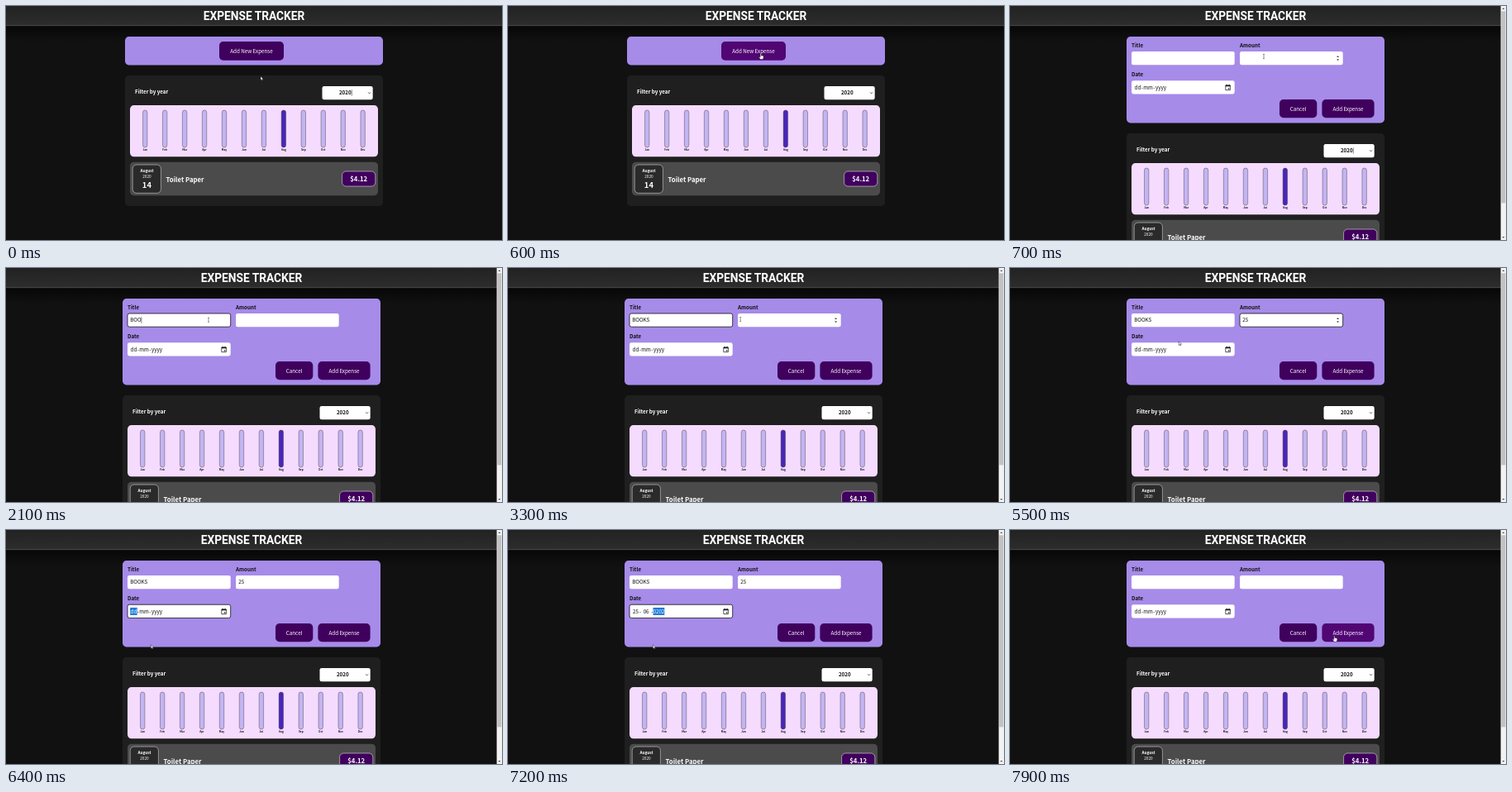
These frames come from a looping animation (600x283 px, 8000 ms). An HTML page:

```html
<!DOCTYPE html>
<html lang="en">
<head>
<meta charset="utf-8">
<title>Expense Tracker</title>
<style>
html, body { margin: 0; height: 100%; overflow: hidden; background: #111; }
svg { display: block; width: 100vw; height: 100vh; }
text { font: 6.25px "Noto Sans CJK JP", "Noto Sans CJK", "Noto Sans", sans-serif; fill: #fff; white-space: pre; }
.b { font-weight: 700; }
.m { text-anchor: middle; }
.k { fill: #111; }
.btn { fill: #40005d; }
.btn.hover { fill: #510674; }
.input { fill: #fff; stroke-width: .8; }
.input.focus { stroke: #111; }
.caret { stroke: #111; stroke-width: .5; }
</style>
</head>
<body>
<svg viewBox="0 0 600 283" preserveAspectRatio="none">
  <defs>
    <linearGradient id="bar" x2="0" y2="1"><stop stop-color="#222"/><stop offset="1" stop-color="#2d2d2d"/></linearGradient>
    <linearGradient id="shade" x2="0" y2="1"><stop stop-opacity=".6"/><stop offset="1" stop-opacity="0"/></linearGradient>
  </defs>
  <rect width="600" height="283" fill="#111"/>
  <rect y="24" width="600" height="20" fill="url(#shade)"/>
  <rect width="600" height="23.5" fill="url(#bar)"/>
  <path d="M0 23.7H600" stroke="#6a6a6a" stroke-width=".6"/>

  <g id="page">
    <text class="m b" x="300" y="17" style="font-family:Roboto,sans-serif;font-size:13.75px">EXPENSE TRACKER</text>
    <rect id="panel" x="144" y="37" width="312" rx="4.7" fill="#a68be9"/>
    <g id="closed">
      <rect id="newBtn" class="btn" x="258" y="43" width="78" height="22.7" rx="4.7"/>
      <text class="m" x="297" y="56.7" font-weight="500">Add New Expense</text>
    </g>
    <g id="list">
      <rect x="144" y="84" width="312" height="158" rx="4.7" fill="#1f1f1f"/>
      <text class="b" x="156" y="105.9">Filter by year</text>
      <rect x="382.5" y="97" width="61.2" height="16.3" rx="2.3" fill="#fff"/>
      <text class="m b k" x="410.3" y="107.4">2020</text>
      <path id="yearCaret" class="caret" d="M418.3 101.3V108.7"/>
      <path d="M438.2 104.4L439.6 105.9 441 104.4" fill="none" stroke="#111" stroke-width=".7"/>
      <rect x="150" y="120" width="300" height="62.3" rx="4.7" fill="#f5dbfe"/>
      <g id="months"></g>
      <rect x="150" y="188.7" width="300" height="40.5" rx="4.7" fill="#4b4b4b"/>
      <rect x="153.2" y="192" width="34.2" height="34.3" rx="4.7" fill="#2a2a2a" stroke="#ececec" stroke-width=".5"/>
      <text class="m b" x="170.4" y="200.8" style="font-size:4.69px">August</text>
      <text class="m" x="170.4" y="207.6" style="font-size:4.69px">2020</text>
      <text class="m b" x="170.4" y="219.6" style="font-size:9.38px">14</text>
      <text class="b" x="193.6" y="212.5" style="font-size:7.81px">Toilet Paper</text>
      <rect x="406.6" y="200" width="40.2" height="18" rx="4.7" fill="#40005d" stroke="#fff" stroke-width=".5"/>
      <text class="m b" x="426.7" y="212.4" style="font-size:7.81px">$4.12</text>
    </g>
  </g>

  <g id="form">
    <text class="b k" x="147" y="49.8">Title</text>
    <text class="b k" x="278" y="49.8">Amount</text>
    <text class="b k" x="147" y="84.8">Date</text>
    <rect id="title" class="input" x="147" y="55" width="124.7" height="16.2" rx="2.3"/>
    <rect id="amount" class="input" x="278" y="55" width="124.7" height="16.2" rx="2.3"/>
    <rect id="date" class="input" x="147" y="90.2" width="124.7" height="16.2" rx="2.3"/>
    <text id="titleText" class="k" x="150.2" y="65.4"></text>
    <text id="amountText" class="k" x="281.2" y="65.4"></text>
    <path id="caret" class="caret"/>
    <path id="spin" d="M395.2 61.9L396.6 60 398 61.9ZM395.2 64.3H398L396.6 66.2Z" fill="#444"/>
    <rect id="mark" y="93.9" height="9" fill="#1a78d6"/>
    <g id="parts"></g>
    <text class="m k" x="159.8" y="100.7">-</text>
    <text class="m k" x="174.4" y="100.7">-</text>
    <path d="M260.8 95.9H266.4V101.6H260.8ZM262.1 94.6V96M265.1 94.6V96" fill="none" stroke="#111" stroke-width=".7"/>
    <path d="M260.8 96.6H266.4M263.8 99.8H265.4" stroke="#111" stroke-width="1.3"/>
    <rect id="cancel" class="btn" x="326" y="113" width="45.3" height="22.2" rx="4.7"/>
    <rect id="addBtn" class="btn" x="377.4" y="113" width="63.2" height="22.2" rx="4.7"/>
    <text class="m" x="348.6" y="126.7" font-weight="500">Cancel</text>
    <text class="m" x="409" y="126.7" font-weight="500">Add Expense</text>
    <rect x="593.6" width="6.4" height="283" fill="#f1f1f1"/>
    <rect x="594.3" y="6.3" width="5" height="232" fill="#c1c1c1"/>
    <path d="M595.3 4L596.8 2.2 598.3 4ZM595.3 279H598.3L596.8 280.8Z" fill="#505050"/>
  </g>
  <path id="pointer" stroke-width=".45" stroke-linejoin="round"/>
</svg>
<script>
const $ = id => document.getElementById(id);
const LOOP = 8000, OPEN = 700, SUBMIT = 7700;

const cursors = {
  arrow: "M0 0V4.7L1.1 3.7 1.8 5.3 2.6 5 1.9 3.4H3.4Z",
  hand: "M-.9 5V.6Q-.9 0 -.4 0T.1 .6V2.7L2.5 3.2Q3.1 3.4 3.1 4V5.3L2.4 7.6H-.6L-2.5 4.9Q-2.2 4 -.9 5Z",
  text: "M-.9 -2.6H.9M0 -2.6V2.6M-.9 2.6H.9"
};
// time, x, y
const path = [
  [0, 308, 85], [150, 308, 82], [500, 306, 57], [600, 306, 57], [700, 307, 61], [850, 307, 61],
  [1200, 245, 62.7], [2900, 245, 62.7], [3400, 285.3, 62], [5100, 285.3, 62], [5700, 176, 98],
  [5950, 176, 98], [6300, 175.3, 138.8], [7200, 175.3, 138.8], [7600, 392.7, 127.6], [8000, 392.7, 127.6]
];
const focusTimes = [[1200, "title"], [3500, "amount"], [5800, "date"], [SUBMIT, ""]];
const titleKeys = [1500, 1700, 2000, 2300, 2500];
const amountKeys = [4400, 4700];
const fields = [
  { x: 150.6, w: 7.7, typed: [[0, "dd"], [6500, "02"], [6700, "25"]] },
  { x: 161.3, w: 11.6, typed: [[0, "mm"], [6800, "00"], [6900, "06"]] },
  { x: 175.9, w: 13, typed: [[0, "yyyy"], [7000, "0002"], [7100, "0020"], [7200, "0202"], [7300, "2021"]] }
];

$("months").innerHTML = "Jan Feb Mar Apr May Jun Jul Aug Sep Oct Nov Dec".split(" ").map((name, i) => {
  const x = 168.2 + i * 23.95;
  return `<rect x="${x - 2.7}" y="126" width="5.4" height="45" rx="2.7" stroke="#313131" stroke-width=".4"
    fill="${name == "Aug" ? "#4826b9" : "#c3b4f3"}"/>
    <text class="m b k" x="${x}" y="175.2" style="font-size:3.13px">${name}</text>`;
}).join("");
$("parts").innerHTML = fields.map(f => `<text class="m" x="${f.x + f.w / 2}" y="100.7"></text>`).join("");

const show = (id, on) => $(id).style.display = on ? "" : "none";
const latest = (steps, t) => steps.filter(s => s[0] <= t).pop();
const blink = age => age % 1000 < 500;

function position(t) {
  const i = path.findIndex(p => p[0] > t);
  const [t0, x0, y0] = path[i - 1], [t1, x1, y1] = path[i];
  const u = (t - t0) / (t1 - t0), e = u * u * (3 - 2 * u);
  return [x0 + (x1 - x0) * e, y0 + (y1 - y0) * e];
}

function over(id, [x, y]) {
  const [l, top, w, h] = ["x", "y", "width", "height"].map(a => +$(id).getAttribute(a));
  return x >= l && x <= l + w && y >= top && y <= top + h;
}

function drawForm(t, pos) {
  const focus = (latest(focusTimes, t) || [0, ""])[1];
  const done = t >= SUBMIT;
  for (const id of ["title", "amount", "date"]) $(id).classList.toggle("focus", focus == id);

  const typed = (id, word, keys) =>
    $(id).textContent = done ? "" : word.slice(0, keys.filter(k => k <= t).length);
  typed("titleText", "BOOKS", titleKeys);
  typed("amountText", "25", amountKeys);
  show("spin", focus == "amount" || over("amount", pos));

  const editing = focus == "title" || focus == "amount";
  if (editing) {
    const label = $(focus + "Text");
    const x = +label.getAttribute("x") + label.getComputedTextLength() + .3;
    $("caret").setAttribute("d", `M${x} 59.3V66.9`);
    const start = focusTimes.find(f => f[1] == focus)[0];
    const last = [start, ...titleKeys, ...amountKeys].filter(k => k >= start && k <= t).pop();
    show("caret", blink(t - last));
  } else show("caret", false);

  const active = t < 6800 ? 0 : t < 7000 ? 1 : 2;
  fields.forEach((f, i) => {
    const part = $("parts").children[i];
    part.textContent = latest(f.typed, done ? 0 : t)[1];
    part.style.fill = focus == "date" && i == active ? "#fff" : "#111";
  });
  $("mark").setAttribute("x", fields[active].x - .4);
  $("mark").setAttribute("width", fields[active].w + .8);
  show("mark", focus == "date");
}

function draw(t) {
  const open = t >= OPEN, pos = position(t);
  show("closed", !open);
  show("form", open);
  $("page").setAttribute("transform", open ? "translate(-3)" : "");
  $("list").setAttribute("transform", open ? "translate(0 70)" : "");
  $("panel").setAttribute("height", open ? 104.5 : 34.5);
  show("yearCaret", t < 1200 && blink(t + 300));
  if (open) drawForm(t, pos);

  const buttons = open ? ["cancel", "addBtn"] : ["newBtn"];
  let kind = open && ["title", "amount", "date"].some(id => over(id, pos)) ? "text" : "arrow";
  for (const id of buttons) {
    const hit = over(id, pos);
    $(id).classList.toggle("hover", hit);
    if (hit) kind = "hand";
  }
  const p = $("pointer");
  p.setAttribute("d", cursors[kind]);
  p.setAttribute("transform", `translate(${pos})`);
  p.setAttribute("fill", kind == "text" ? "none" : "#fff");
  p.setAttribute("stroke", "#111");
}

const begin = performance.now();
function tick() {
  draw((performance.now() - begin) % LOOP);
  requestAnimationFrame(tick);
}
tick();
</script>
</body>
</html>
```
